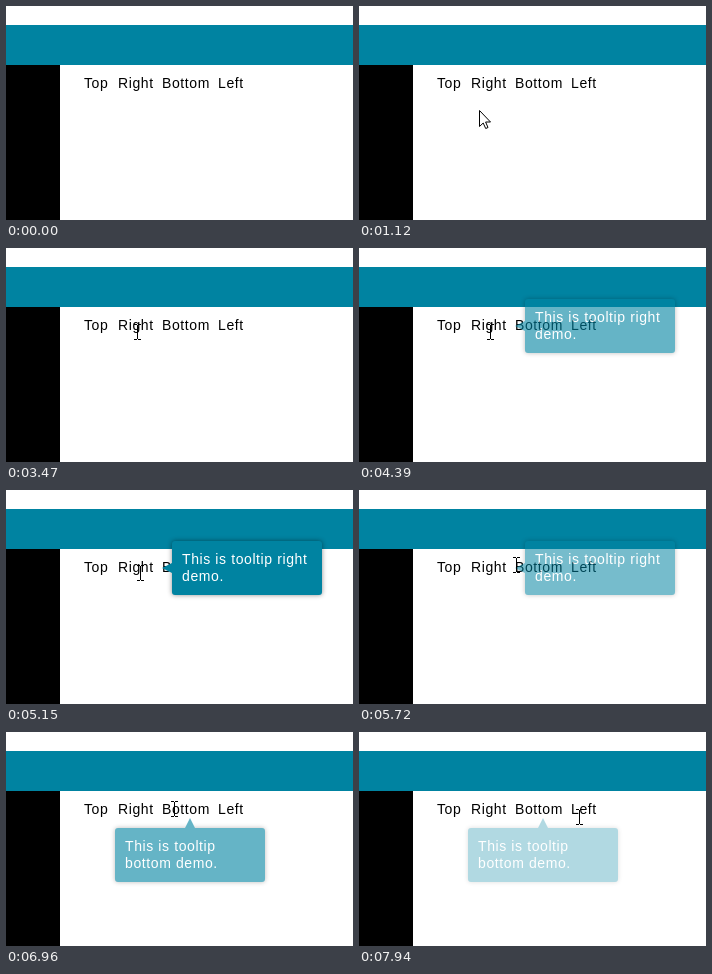
Write an HTML page that moves like this. It is 347x214 px and loops after 8 s.

```html
<!DOCTYPE html>
<html lang="en">
<head>
<meta charset="utf-8">
<title>Tooltip demo</title>
<style>
  html, body { margin: 0; width: 100%; height: 100%; overflow: hidden; background: #fff; }
  body { position: relative; font: 14px/17px "Liberation Sans", Arial, sans-serif; letter-spacing: .6px; }
  body > * { position: absolute; }
  .header { top: 19px; left: 0; width: 100%; height: 40px; background: #0083a1; }
  .sidebar { top: 59px; left: 0; width: 54px; bottom: 0; background: #000; }
  .word { top: 69px; color: #000; }
  .tip {
    --fill: #0083a1;
    box-sizing: border-box; width: 150px; height: 54px; padding: 10px;
    border-radius: 3px; background: var(--fill); color: #fff;
    box-shadow: 0 0 5px rgba(0, 0, 0, .45); white-space: nowrap; opacity: 0;
  }
  .tip::after { content: ""; position: absolute; background: var(--fill); }
  .top { left: 20px; top: 5px; }
  .right { left: 166px; top: 51px; }
  .bottom { left: 109px; top: 96px; }
  .top::after, .bottom::after { left: 70px; width: 10px; height: 10px; }
  .top::after { top: 54px; clip-path: polygon(0 0, 100% 0, 50% 100%); }
  .bottom::after { top: -10px; clip-path: polygon(0 100%, 100% 100%, 50% 0); }
  .right::after { left: -10px; top: 22px; width: 10px; height: 10px; clip-path: polygon(100% 0, 100% 100%, 0 50%); }
  svg { left: 0; top: 0; width: 347px; height: 214px; }
</style>
</head>
<body>
<div class="header"></div>
<div class="sidebar"></div>
<span class="word" style="left:78px">Top</span>
<span class="word" style="left:112px">Right</span>
<span class="word" style="left:156px">Bottom</span>
<span class="word" style="left:212px">Left</span>
<div class="tip top">This is tooltip top<br>demo.</div>
<div class="tip right">This is tooltip right<br>demo.</div>
<div class="tip bottom">This is tooltip<br>bottom demo.</div>
<svg viewBox="0 0 347 214">
  <g id="cursor">
    <path id="beam" d="M-3.5-7.5h3M.5-7.5h3M0-7V7M-3.5 7.5h3M.5 7.5h3" fill="none" stroke="#000" shape-rendering="crispEdges"/>
    <path id="arrow" d="M.5.5V16.5L4.2 13L6.7 18.5L9 17.5L6.6 12H11.5Z" fill="#fff" stroke="#000"/>
  </g>
</svg>
<script>
const LOOP = 8000, FADE_OUT = 300;
const find = selector => document.querySelector(selector);
const clamp = v => Math.max(0, Math.min(1, v));
const ease = p => p * p * (3 - 2 * p);

// Pointer moves are sampled in a fixed number of steps, like a screen recording.
const moves = [
  { start: 590, end: 1350, steps: 11, to: [88, 75] },
  { start: 3080, end: 3470, steps: 6, to: [131, 84] },
  { start: 5150, end: 5390, steps: 4, to: [150, 75] },
  { start: 5550, end: 5890, steps: 5, to: [161, 75] },
  { start: 6250, end: 6480, steps: 4, to: [168, 77] },
  { start: 7570, end: 7940, steps: 6, to: [220, 85] },
];
const entry = [194, 173];

const tips = [
  { el: find('.top'), half: 2330, full: 2380, leave: 3150, opaque: true },
  { el: find('.right'), half: 4390, full: 4460, leave: 5580 },
  { el: find('.bottom'), half: 6960, full: 7010, leave: 7730 },
];

function pointerAt(t) {
  const i = moves.findLastIndex(m => t >= m.start);
  if (i < 0) return null;
  const { start, end, steps, to } = moves[i];
  const from = i ? moves[i - 1].to : entry;
  const gap = (end - start) / (steps - 1);
  const step = Math.min(steps - 1, Math.floor((t - start) / gap + 1e-6));
  const p = ease((step + 1) / steps);
  return {
    x: Math.round(from[0] + (to[0] - from[0]) * p),
    y: Math.round(from[1] + (to[1] - from[1]) * p),
    time: start + step * gap,
  };
}

function strength(tip, t, sampled) {
  if (t < tip.half) return 0;
  if (t < tip.full) return .6;
  return 1 - clamp((sampled - tip.leave) / FADE_OUT);
}

function render(t) {
  const pointer = pointerAt(t);
  find('#cursor').style.display = pointer ? '' : 'none';
  if (pointer) {
    const overText = pointer.y < 92;
    const nudge = overText ? .5 : 0;
    find('#cursor').setAttribute('transform', `translate(${pointer.x + nudge} ${pointer.y})`);
    find('#beam').style.display = overText ? '' : 'none';
    find('#arrow').style.display = overText ? 'none' : '';
  }
  for (const tip of tips) {
    const s = strength(tip, t, pointer ? pointer.time : 0);
    tip.el.style.opacity = tip.opaque ? Math.min(1, s / .6) : s;
    if (tip.opaque) {
      // Stays pale rather than see-through while it crosses the header.
      const tint = Math.max(.6, s);
      const mix = c => Math.round(255 + (c - 255) * tint);
      tip.el.style.setProperty('--fill', `rgb(${mix(0)}, ${mix(131)}, ${mix(161)})`);
      tip.el.style.color = `rgba(255, 255, 255, ${tint})`;
    }
  }
}

const origin = performance.now();
function frame() {
  render((performance.now() - origin) % LOOP);
  requestAnimationFrame(frame);
}
frame();
</script>
</body>
</html>
```
